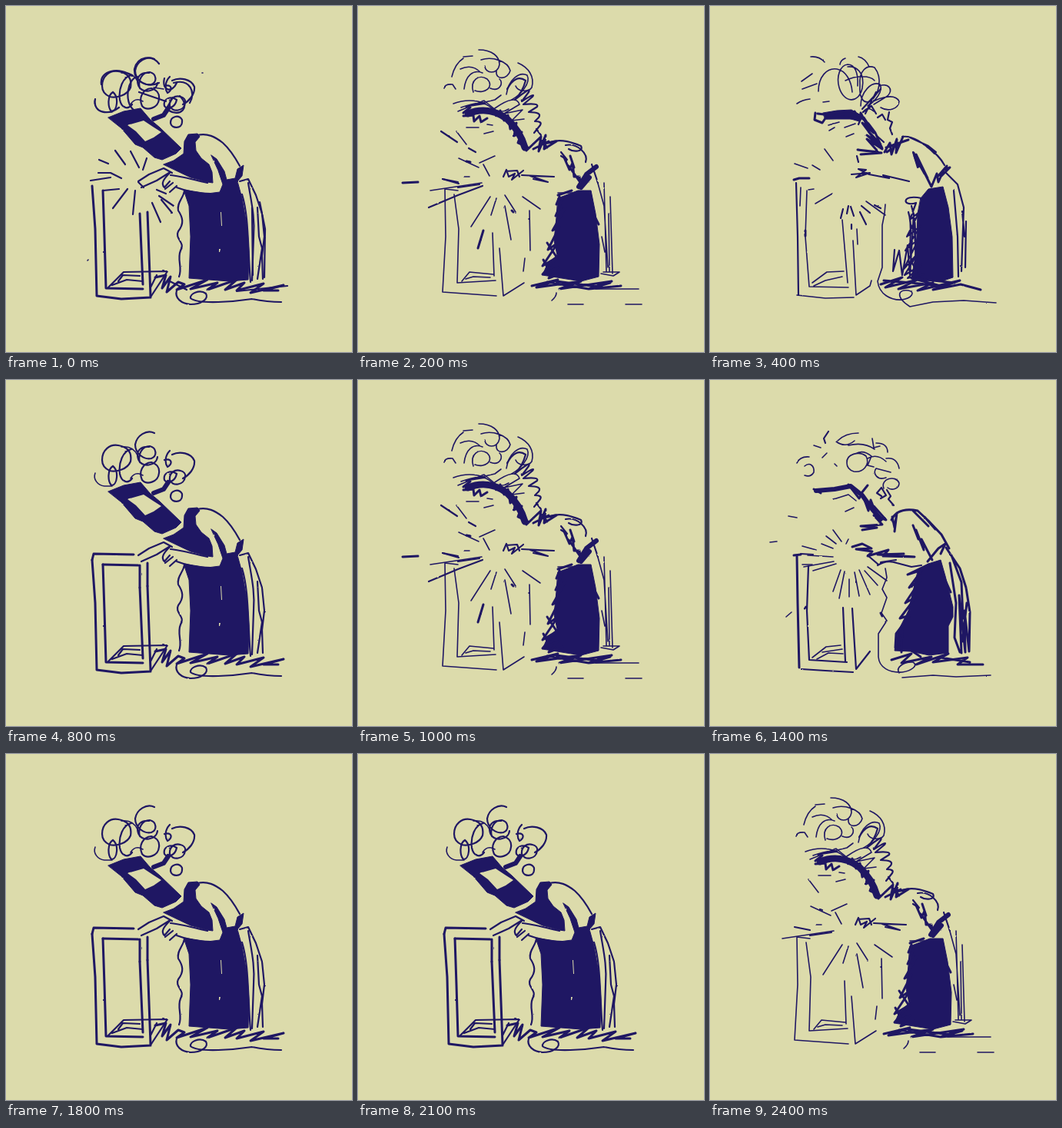
An HTML page without scripts for the animation above (2500 ms loop, 450 px wide and 450 px high).

```html
<!DOCTYPE html>
<html lang="en">
<head>
<meta charset="utf-8">
<title>Welder at work</title>
<style>
  html, body { margin: 0; width: 100%; height: 100%; overflow: hidden; background: #dcdbab; }
  svg { display: block; width: 100%; height: 100%; }
  .ink { fill: none; stroke: #1f1763; stroke-width: 2.2; stroke-linecap: round; stroke-linejoin: round; }
  .fine { stroke-width: 1.6; }
  .bold { stroke-width: 3; }
  .fat { stroke-width: 6; }
  .band { stroke-width: 9; }
  .solid { fill: #1f1763; stroke-width: 1; }
  .gap { fill: #dcdbab; stroke: none; }
  .pose { visibility: hidden; animation: 2.5s step-end infinite; }
  /* one drawing lasts 4% of the loop */
  #mask { animation-name: mask; }
  #calm { animation-name: calm; }
  #flash { animation-name: flash; }
  #bend { animation-name: bend; }
  #burst { animation-name: burst; }
  #stray { animation-name: stray; }
  #lean { animation-name: lean; }
  @keyframes mask {
    0%, 24%, 32%, 48%, 68%, 80%, 92% { visibility: visible; }
    4%, 28%, 36%, 52%, 76%, 88%, 96%, 100% { visibility: hidden; }
  }
  @keyframes calm {
    32%, 72%, 84% { visibility: visible; }
    0%, 36%, 76%, 88%, 100% { visibility: hidden; }
  }
  @keyframes flash {
    0%, 24%, 48%, 68%, 80%, 92% { visibility: visible; }
    4%, 28%, 52%, 72%, 84%, 96%, 100% { visibility: hidden; }
  }
  @keyframes bend {
    4%, 16%, 28%, 44%, 60% { visibility: visible; }
    0%, 8%, 20%, 32%, 48%, 64%, 100% { visibility: hidden; }
  }
  @keyframes burst {
    8%, 20%, 40%, 52%, 64%, 76%, 88%, 96% { visibility: visible; }
    0%, 12%, 24%, 44%, 56%, 68%, 80%, 92% { visibility: hidden; }
  }
  @keyframes stray {
    8%, 20%, 40% { visibility: visible; }
    0%, 12%, 24%, 44%, 100% { visibility: hidden; }
  }
  @keyframes lean {
    12%, 36%, 56% { visibility: visible; }
    0%, 16%, 40%, 60%, 100% { visibility: hidden; }
  }
</style>
</head>
<body>
<svg viewBox="0 0 450 450">
  <defs>
    <filter id="rough" filterUnits="userSpaceOnUse" x="0" y="0" width="450" height="450" color-interpolation-filters="sRGB">
      <feTurbulence type="fractalNoise" baseFrequency=".12" numOctaves="2" seed="4"/>
      <feDisplacementMap in="SourceGraphic" scale="1.6" xChannelSelector="R" yChannelSelector="G"/>
    </filter>
  </defs>
  <rect width="450" height="450" fill="#dcdbab"/>
  <g class="ink" filter="url(#rough)">

    <!-- mask down -->
    <g id="mask" class="pose">
      <path d="M193 69C183 64 170 72 168 84C168 96 180 104 189 102C197 99 196 88 187 86C177 86 171 97 174 107
        M125 104C125 91 135 83 146 85C158 87 164 94 162 106C158 116 144 120 135 118C128 115 125 110 125 104
        M163 90C152 92 146 108 148 122C150 132 158 136 164 128
        M197 100C196 112 176 115 172 103C168 90 178 86 186 87
        M199 121C198 133 183 137 177 130C172 119 178 108 189 107C196 109 200 114 199 121
        M139 112C132 116 132 131 137 137C145 137 147 118 139 112
        M213 92C207 98 206 107 210 113C217 109 216 101 206 104
        M216 97C226 92 241 95 245 105C246 115 238 124 230 128
        M233 126C232 137 216 139 213 130C212 120 220 116 227 118C231 119 234 122 233 126
        M222 122C214 116 204 121 206 130C210 136 220 132 222 122
        M229 151C229 160 215 160 214 152C214 143 225 141 229 148Z"/>
      <path class="fine" d="M116 121C113 129 119 137 128 138L138 138M162 128Q168 118 178 124M150 87Q165 85 171 98"/>
      <path class="fat" d="M192 147L205 142L211 133"/>
      <path class="solid" d="M133 145L153 137L175 133L187 147L200 158L228 185L221 192L203 200L193 197L178 184L168 180L150 159Z"/>
      <path class="gap" d="M158 155L179 149L191 157L202 164L192 171L181 176L169 163Z"/>
      <path class="solid" d="M205 206L218 201L231 192L232 176L237 167L249 166L252 170L246 177L247 188L254 198L264 206L268 216L269 230L262 229L240 223L219 213Z"/>
      <path class="solid" d="M267 194L274 199L284 215L287 226L298 224L301 212L309 207L307 221L301 228L307 250L314 290L316 320L315 356L290 358L238 354L240 300L238 260L231 239L262 244L278 242L282 232L276 214Z"/>
      <path class="gap" d="M279 268l1 0l1 18l-1 0ZM277 316l2 0l-1 4l-1 0Z"/>
      <path d="M249 168C262 165 272 170 282 178C292 187 298 197 304 208M304 228L315 225L325 246L333 270L336 300L333 325L334 355M315 230C319 255 324 275 322 300L320 357M327 262L329 300L333 315L327 355M307 245C316 275 314 310 318 359"/>
      <path d="M172 228L186 219L205 211L216 217M176 236L196 227L212 217
        M213 217C205 225 201 231 206 236L213 228M207 238L217 230M213 242L222 234M214 220C226 221 240 225 262 230M222 236C235 241 250 244 266 244"/>
      <path class="bold" d="M112 234L116 290L118 377L150 381L188 379M126 240L128 300L130 367L178 368M174 270L178 362M184 268L188 378"/>
      <path d="M133 366L153 346L210 345L189 377M138 363L157 356L178 358M196 350L188 366M146 358L152 350L174 351"/>
      <path d="M232 240C231 250 222 255 224 266C230 275 232 283 224 293C219 303 234 308 227 318C222 330 230 340 225 352M222 370C219 380 228 387 240 388C254 388 264 381 260 374C252 368 239 374 240 380C250 389 300 384 320 381C335 384 345 385 358 385"/>
      <path class="bold" d="M194 353L208 350L203 367L214 352L209 372L224 359L232 362L222 369L262 356L240 368L275 360L262 369L300 356L285 369L310 360L300 370L335 361L318 373L361 363L335 370L354 370"/>
    </g>
    <g id="calm" class="pose">
      <path class="bold" d="M112 234L114 226L166 227M126 240L172 241M174 241V270M184 238V268"/>
    </g>
    <g id="flash" class="pose">
      <path d="M199 75C190 63 171 65 167 82C166 98 184 107 199 100M116 121C113 139 132 143 147 132M124 102C121 83 149 79 164 91M171 92C158 94 153 125 166 135M206 94C202 110 216 114 222 100M218 100C240 94 247 113 239 126M226 117C241 132 226 145 212 136M203 143L217 119M173 112L208 124"/>
      <path d="M121 200L133 205M120 217L136 217L150 224M142 188L155 206M162 189L173 210M183 198L178 213M110 227L136 223M126 240L147 238M158 238L139 263M168 240L165 271M190 256L201 281M202 252L216 269M199 247L218 260M196 239L208 244M172 229L179 236"/>
      <path d="M320 262L321 350M330 255L337 290L336 353M300 371L366 364M211 357L235 369"/>
      <path class="fine" d="M106 331l1-1M255 87l1 0M192 106L205 108"/>
    </g>

    <!-- visor lifted, arm stretched -->
    <g id="bend" class="pose">
      <path class="fine" d="M131 66Q142 65 149 73M119 98L133 88M120 108L139 101M113 127Q120 122 130 121M147 125L155 124M169 76Q170 70 176 68M193 66Q202 68 207 79"/>
      <path class="fine" d="M141 111C141 92 152 80 165 82C177 84 184 98 185 112M192 104C193 88 189 76 179 76C169 77 164 92 168 106C174 126 193 128 198 107C202 86 190 78 179 79M176 97C190 90 208 90 214 97M195 104C193 84 204 76 214 80C225 94 220 116 208 124C198 128 194 116 195 104M196 130C196 112 210 97 221 102C226 110 215 124 205 130M220 104C232 100 239 108 231 117L213 128M205 130C215 120 240 112 246 124C245 134 232 138 222 132M200 137Q205 130 213 137"/>
      <path class="solid" d="M147 139L165 136L184 135L196 142L194 150L180 146L150 147Z"/>
      <path class="bold" d="M137 139L136 148L146 152L150 146L190 146L140 140M192 141L206 153L215 165L224 185M188 137L195 148L196 139L205 157L200 145L213 165L198 152L216 176L206 163L222 180L204 168L224 186L204 173L219 190L192 187L223 191L196 193"/>
      <path class="bold" d="M227 190L234 178L236 193L243 173L242 191L251 170M229 184L258 174M230 190L247 178"/>
      <path d="M199 138L210 130L216 140M198 134L222 108M202 140L216 112M218 145L224 141L228 148M233 138L231 148L237 151L234 159L237 167M196 147L193 154M191 195L193 203M216 168L226 177"/>
      <path class="fine" d="M154 155L168 151M155 162L162 158M175 158L189 153M177 170L187 166"/>
      <path d="M250 170C264 168 280 180 292 192M260 171L284 182L294 190M264 190L270 210M282 183Q298 194 305 207"/>
      <path class="bold" d="M265 191L271 209L266 195L279 218L274 207L288 235M268 193L283 224M288 235L295 218L297 229L304 213L312 210L300 222M296 222L308 208"/>
      <path d="M184 219L208 217L190 223L203 213L193 212L207 219L233 224L225 220L259 228"/>
      <path d="M306 216L322 232L330 262L327 345M333 280L332 340M317 240L322 300L323 352M328 267L331 300"/>
      <path class="solid" d="M274 250L284 238L303 235L310 262L315 300L316 353L301 358L286 357L262 354L266 332L269 300L270 270Z"/>
      <path d="M275 250C248 244 250 262 268 256L260 278L272 268L256 300L274 286L254 318L272 302L252 342L270 322L253 350L275 337L257 354L278 349M240 317L238 345L246 318L250 350L257 311L260 350L265 270L269 355M258 268C266 290 254 320 266 340M262 260C272 290 262 320 274 350"/>
      <path class="bold" d="M222 362L250 353L228 366L270 356L245 368L290 360L270 370L325 357L290 369L326 362L352 369M226 357L262 360L300 364L262 354L318 360"/>
      <path class="fine" d="M110 205L127 211M149 186L160 201M133 207L143 213M137 257L159 244M203 254L228 272"/>
      <path d="M170 276L173 264M178 270L180 260M183 261L187 273M184 284v6M195 268L203 284M197 260L208 269M214 259L222 263"/>
      <path class="bold" d="M109 226L116 224L129 224M124 292l0 7"/>
      <path d="M112 230L114 300L115 376"/>
      <path class="fine" d="M113 376L150 380L187 379M126 240L124 300L129 365L180 366M118 236L117 260M128 239L135 238M172 278L179 360M186 305L190 376L208 364L210 357M133 360L152 346L174 345M135 364L150 357L172 352M191 290L192 310"/>
      <path class="fine" d="M228 258L227 270L224 285L224 340L218 358C220 375 235 383 250 382C262 380 268 372 258 370C245 368 240 378 260 391L290 385L330 383L372 386"/>
    </g>

    <!-- big burst -->
    <g id="burst" class="pose">
      <path class="fine" d="M112 107Q113 101 123 102L127 108M122 92Q126 75 137 68M137 66L149 65M157 57C175 57 184 66 184 76C182 90 165 88 165 78M160 70C175 65 195 72 198 84C195 96 178 97 180 84M133 82Q148 75 159 86M138 108C140 90 150 82 162 87M150 112C145 96 158 88 168 95C178 105 165 115 152 110M172 107C184 112 190 100 184 95M193 115C196 95 210 85 220 90C225 100 212 115 200 122M208 74C222 80 230 92 226 106C222 112 208 112 205 104"/>
      <path d="M194 108Q205 88 218 97Q214 112 204 122Q226 104 222 112L213 124Q232 112 227 118L215 128Q236 126 233 131L222 138Q240 138 235 145L230 150Q240 150 237 155L229 165M232 160L238 168"/>
      <path class="fine" d="M124 127Q145 119 166 127L140 131L178 122L186 116M130 137L164 123L180 136M178 133Q205 114 210 128L190 140L214 135L200 149L216 147M134 132Q160 122 170 130Q184 142 196 134"/>
      <path class="band" d="M143 140C160 133 178 135 194 147C206 158 213 170 217 184"/>
      <path class="bold" d="M137 139L146 132M137 143L150 142L151 150L158 143L160 151L168 146M185 136L190 149L195 142L198 160L206 152L203 169L213 164L208 178L221 184"/>
      <path class="bold" d="M219 188L238 170L235 189L244 168L242 186L258 176L236 180M228 186L248 176M236 172L246 184"/>
      <path class="fine" d="M141 158H157M168 154L175 155M164 166L176 163"/>
      <path d="M250 177C265 172 280 178 290 182C294 190 280 190 274 186M270 181C285 178 300 192 296 203M264 190L272 200L264 195M304 206L312 230"/>
      <path class="bold" d="M268 197L275 213L279 204L281 222L288 222L290 235M276 195L281 210M274 208L288 228"/>
      <path class="fat" d="M287 235L297 219L310 209M290 236L301 223"/>
      <path d="M189 222L193 213L196 222L204 218L200 226L215 214M192 215L207 214L210 222M213 220L255 222L224 221L247 229L228 225"/>
      <path class="fine" d="M320 230L323 345M311 227L320 260L325 340M328 248L331 348M319 346H340L332 351L316 348M317 300L321 320M326 270L327 345"/>
      <path class="solid" d="M260 250L286 240L303 240L309 270L314 310L313 352L290 358L240 350L246 336L259 324L255 305L258 275Z"/>
      <path class="bold" d="M262 248L258 258L266 252L257 273L270 262L253 292L262 287L247 317L260 308L240 338L260 326L240 349L260 340L248 354L266 347M246 308L258 326M241 330L251 349M260 246L278 240M306 270L313 284"/>
      <path class="bold" d="M226 364L260 356L232 366L290 358L262 368L330 358L300 368L342 364M246 359L300 368L328 360M258 358L318 366"/>
      <path class="fine" d="M309 368H365M273 388H293M348 388H369M258 373Q258 378 252 383M260 243H281"/>
      <path class="fine" d="M128 163L141 180M178 195L158 204M131 198L157 210M94 240L161 230M138 222L145 222M172 248L147 287M180 250L173 272M191 260L199 304M191 246L205 268M214 248L237 264M163 206L171 221"/>
      <path d="M110 225L130 229M143 202l3 1M130 236L158 232"/>
      <path class="fine" d="M113 238L114 300L110 372L180 377M125 245L131 290L129 360L179 357M113 238L130 240M135 358L145 346L176 349M140 355L150 352L172 353M175 295L177 351M184 315L189 377L216 360M223 266L224 318M217 328L215 345"/>
    </g>
    <g id="stray" class="pose">
      <path class="bold" d="M58 230L78 229M163 292L156 315M141 202l5 1M200 266l2 2"/>
      <path d="M108 163L129 177M92 262L130 246L162 234M144 185L153 190M110 225L131 231"/>
    </g>

    <!-- leaning in -->
    <g id="lean" class="pose">
      <path class="fine" d="M113 108Q117 99 129 100M123 112C130 106 136 112 135 120Q131 127 123 124M135 85L144 88M146 101L152 95M162 109L165 112M166 79Q176 69 193 69M164 80Q176 89 188 79M180 85Q200 80 214 90M211 76L213 88L221 86M216 82Q231 82 231 94M205 102Q217 95 229 106M229 102Q243 100 246 115M229 127C218 131 211 122 216 115L235 120M226 141C221 128 242 123 246 134C246 142 236 144 231 140M178 108C177 96 194 92 203 99C209 111 198 121 187 119Q178 116 178 108M189 96Q199 90 210 99L205 111L213 113"/>
      <path d="M154 67L148 76L150 82M217 147L223 140L229 150L222 154M230 143L235 151L232 155L239 163M217 147L223 151"/>
      <path class="fat" d="M138 144L162 142L183 138L198 150L211 168L222 181"/>
      <path class="bold" d="M135 142L144 147M180 136L194 154L198 148L206 170L209 156L218 179L213 164L229 182L213 176L224 188L196 190L217 192L198 195M197 147L205 137"/>
      <path class="fine" d="M161 155L180 149L190 157M176 171L187 166M102 177L113 179M78 211L87 210"/>
      <path class="bold" d="M237 178L240 192L243 173L240 197M236 182Q244 165 270 170L284 183L301 201L311 219M264 170L284 190M264 189L271 207L268 195L278 221L275 207L289 234M283 236L297 219L306 213L300 226M279 178L293 194"/>
      <path class="bold" d="M185 217L198 213L210 219L190 220L211 223L205 229L232 221L225 229L266 230L218 227L252 226"/>
      <path d="M218 241Q230 233 243 238L262 243L275 241M205 228L219 240M222 237L242 234"/>
      <path class="bold" d="M307 218L325 245L333 270L338 302L337 353L331 300L332 354L324 280L327 355M314 228L327 263L329 310M312 238L320 290L318 335L325 354M334 290L328 340"/>
      <path class="solid" d="M270 250L284 239L300 234L306 255L316 295L316 308L310 320L310 355L285 358L261 353L240 352L244 328L258 300L264 275Z"/>
      <path class="bold" d="M284 240L257 253L276 247L259 270L274 260L254 290L268 282L247 310L260 306L242 330L241 348L250 320L249 354M268 262L264 284M298 242L313 276"/>
      <path class="bold" d="M236 364L262 356L249 368L288 360L268 370L310 356L290 367L335 361L322 370L355 370M262 352L274 360M300 361L338 367"/>
      <path class="fine" d="M120 216L138 221M145 213L160 219M151 203L164 213M160 195L171 210M127 228L160 230M122 243L161 236M134 248L164 239M170 247L160 275M175 249L168 284M181 259V282M188 250L194 281M194 247L208 279M201 248L218 267M205 243L230 261M180 207L177 213M99 308L106 302"/>
      <path class="bold" d="M109 228L118 227M113 228L114 290L116 374M123 297l2-2M222 303l2 4"/>
      <path d="M118 226L134 227M128 242L126 300L129 364L178 367M173 296L176 366M185 297L190 376L208 353M119 376L150 378L186 380"/>
      <path class="fine" d="M120 240L133 240M133 361L151 347L170 345M139 363L154 355L173 356M146 354L172 350"/>
      <path class="fine" d="M228 245L230 257L224 272L230 283L223 303L230 313L219 330L219 360C220 374 233 381 250 380C263 378 271 371 264 367C252 366 241 374 246 381M250 387L290 384L320 386L365 384"/>
    </g>
  </g>
</svg>
</body>
</html>
```
